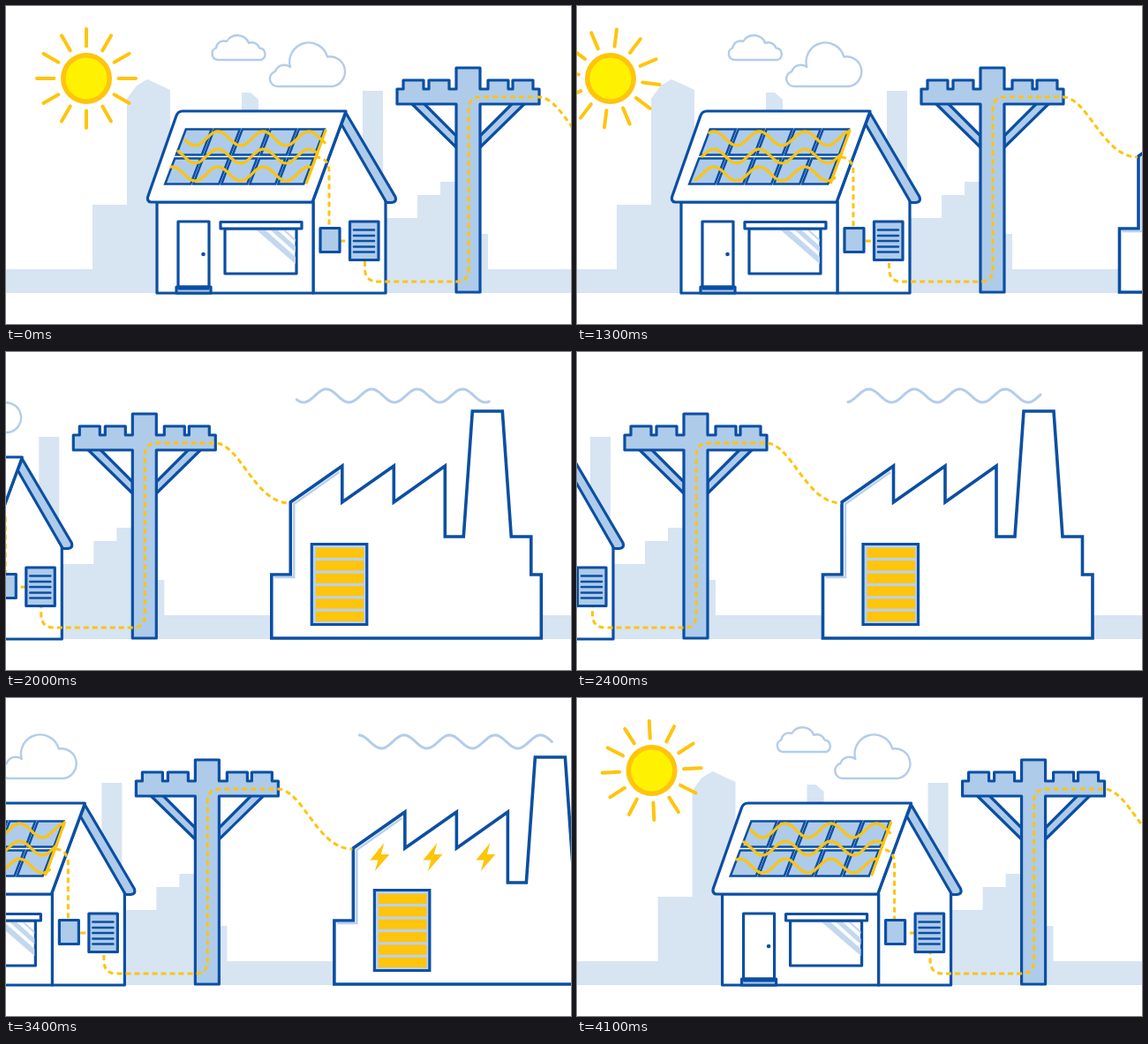
These frames come from a looping animation (640 by 360 pixels, 4200 ms). An HTML page:

```html
<!DOCTYPE html>
<html lang="en">
<head>
<meta charset="utf-8">
<title>Solar power to the grid</title>
<style>
html, body { margin: 0; width: 100%; height: 100%; overflow: hidden; background: #fff; }
svg { display: block; width: 640px; height: 360px; }
.line { fill: none; stroke: #0b4fa3; stroke-width: 3.2; stroke-linejoin: round; stroke-linecap: round; }
.white { fill: #fff; }
.blue { fill: #aecbea; }
.pale { fill: #d7e4f2; }
.cloud { fill: #fff; stroke: #b3cdea; stroke-width: 2.4; stroke-linejoin: round; }
.wire { fill: none; stroke: #ffc40c; stroke-width: 3; stroke-dasharray: 6 4; }
.wave { fill: none; stroke: #ffc40c; stroke-width: 3.2; stroke-linecap: round; }
.gold { fill: #ffc40c; }
</style>
</head>
<body>
<svg viewBox="0 0 640 360">
  <clipPath id="level"><rect id="fill" x="710" width="70" height="90"/></clipPath>
  <g id="world">
    <g class="pale">
      <path d="M0 298H98V225H137V105L148 90L160 83L186 95V325H0Z"/>
      <path d="M267 98H277L286 106V122H267Z"/>
      <path d="M404 96H427V240H404Z"/>
      <path d="M431 325V240H466V214H492V199H512V258H546V298H668V325Z"/>
      <path d="M970 298H1030V325H970Z"/>
    </g>

    <g id="sun">
      <g id="rays" stroke="#ffc40c" stroke-width="4" stroke-linecap="round"></g>
      <circle cx="91" cy="82" r="29" class="gold"/>
      <circle cx="91" cy="82" r="23.5" fill="#fff200"/>
    </g>

    <g id="clouds">
      <path class="cloud" d="M240 61A7 7 0 0 1 238 47.500A9 9 0 0 1 250 40A14 14 0 0 1 275 42A9 9 0 0 1 287 47.500A7 7 0 0 1 289 61Z"/>
      <path class="cloud" d="M308 91A8.700 8.700 0 0 1 305 74A11 11 0 0 1 322 69A21 21 0 0 1 364 57.500A17 17 0 0 1 370 91Z"/>
    </g>

    <g id="house">
      <path class="line white" d="M348 325V220L382 128L430 218V325Z"/>
      <path class="line white" d="M171 222H348V325H171Z"/>
      <path class="line blue" d="M385 121L441 216Q443 222 437 222.500H431L380 134Z"/>
      <path class="line white" d="M200 119H385L347 222H164Q159 221 161 215L193 124Q195 119 200 119Z"/>
      <path class="line white" d="M195 244H230V318H195Z"/>
      <path class="line blue" d="M193 318H232V325H193Z"/>
      <path class="line" d="M196 320H229"/>
      <circle cx="223.500" cy="281" r="2.300" fill="#0b4fa3"/>
      <path class="line white" d="M248 252H329V303H248Z"/>
      <path d="M284 254H294L328 284V292ZM300 254H308L328 272V279ZM314 254H317L328 264V267Z" fill="#c3d8ef"/>
      <path class="line white" d="M243 244.500H335V252H243Z"/>
      <g id="panels"></g>
      <path class="wave" d="M362 141L340.500 200"/>
      <path class="wave row"/><path class="wave row"/><path class="wave row"/>
      <path class="wire" d="M350 171Q366 171 366 188V251"/>
      <path class="wire" d="M378 266H390"/>
    </g>

    <g id="pole" class="line blue">
      <path d="M459 110L510 160V147L473 110ZM588 110L537 160V147L574 110Z"/>
      <path d="M510 324V111H443V94H450V84H473V94H479V84H502V94H510V70H537V94H546V84H569V94H574V84H597V94H604V111H537V324Z"/>
    </g>

    <g id="factory">
      <path class="line white" style="stroke-width:3.600;stroke-linejoin:miter" d="M667.500 324V252H689V170L747.500 129V170L806 129V170L864 129V209H885L895 67H929L939 209H961.500V252H973V324Z"/>
      <path d="M670.500 255H693V172L744 136" fill="none" stroke="#b9d1ec" stroke-width="2.500"/>
      <path class="line" style="fill:#b9d1ec;stroke-linejoin:miter" d="M713 217.500H775.500V308.500H713Z"/>
      <g id="bars" class="gold" clip-path="url(#level)"></g>
      <g id="bolts" class="gold"></g>
    </g>
    <path id="smoke" fill="none" stroke="#b3cdea" stroke-width="3" stroke-linecap="round"/>

    <path class="wire" d="M406.500 289V298Q407 312 421 312H510Q524 312 524 298V117Q524 103 538 103H603C632 103 648 171 688 171"/>
    <path class="line blue" d="M356 251.500H378V278.500H356Z"/>
    <path class="line blue" d="M389.500 244H422V287.500H389.500Z"/>
    <path class="line" style="stroke-width:2.600" d="M394 253.500H417M394 260H417M394 266H417M394 272.500H417M394 278.500H417"/>
  </g>
</svg>
<script>
const LOOP = 4200, PAN = 389, WAVE = 51.5;
const $ = id => document.getElementById(id);
const all = sel => [...document.querySelectorAll(sel)];

function add(parent, tag, attrs) {
  const el = document.createElementNS("http://www.w3.org/2000/svg", tag);
  for (const key in attrs) el.setAttribute(key, attrs[key]);
  return parent.appendChild(el);
}

for (let i = 0; i < 12; i++)
  add($("rays"), "path", { d: "M91 45.500V26", transform: `rotate(${i * 30} 91 82)` });

// Slanted panels: the left edge leans with the roof.
const lean = y => 203 - 24 * (y - 139) / 63;
for (const [top, bottom] of [[139.5, 168.5], [172.5, 201.5]])
  for (let i = 0; i < 5; i++) {
    const a = lean(top) + i * 32 + 1, b = lean(bottom) + i * 32 + 1;
    add($("panels"), "path", {
      d: `M${a} ${top}H${a + 29}L${b + 29} ${bottom}H${b}Z`,
      class: "line blue", style: "stroke-width:2.5;stroke-linejoin:miter"
    });
  }

const bolts = [];
for (let i = 0; i < 6; i++)
  add($("bars"), "rect", { x: 717.5, y: 293.8 - i * 14.4, width: 54.5, height: 11.2 });
for (let i = 0; i < 3; i++)
  bolts.push(add($("bolts"), "path", {
    d: "M724 164L708 183.500H717L713.500 196L730 177H720.500Z", transform: `translate(${i * 60})`
  }));

function wave(x0, x1, y, amp, crest) {
  let d = "";
  for (let x = x0; x <= x1; x += 2) {
    const h = amp * Math.cos(2 * Math.PI * (x - crest) / WAVE);
    d += (d ? "L" : "M") + x + " " + (y - h).toFixed(2);
  }
  return d;
}

const clamp = u => Math.min(1, Math.max(0, u));

function ease(t, start) {
  const u = clamp((t - start) / 1110);
  return (1 - Math.cos(Math.PI * u ** 0.87)) / 2;
}

const rows = all(".row"), wires = all(".wire");
const show = (el, on) => el.setAttribute("visibility", on ? "visible" : "hidden");

function draw(t) {
  const p = t / LOOP, shift = 2 * WAVE * p;
  const cam = PAN * (ease(t, 1085) - ease(t, 3095));
  $("world").setAttribute("transform", `translate(${-cam.toFixed(2)})`);
  $("rays").setAttribute("transform", `rotate(${120 * p} 91 82)`);
  $("clouds").setAttribute("transform", `translate(${5 * Math.cos(4 * Math.PI * p) - 5})`);
  rows.forEach((el, i) =>
    el.setAttribute("d", wave(203 - 8 * i, 361 - 8 * i, 150 + 20 * i, 8, 240 - shift)));
  $("smoke").setAttribute("d", wave(696, 914, 49.5, 7.5, 778.5 - shift));
  wires.forEach(el => el.setAttribute("stroke-dashoffset", -200 * p));
  $("fill").setAttribute("y", 306 - 86 * clamp((t - 1200) / 650));
  bolts.forEach((el, i) => show(el, t >= 2500 + i * 200 && t < 3500));
}

const begin = performance.now();
function tick() {
  draw((performance.now() - begin) % LOOP);
  requestAnimationFrame(tick);
}
tick();
</script>
</body>
</html>
```
